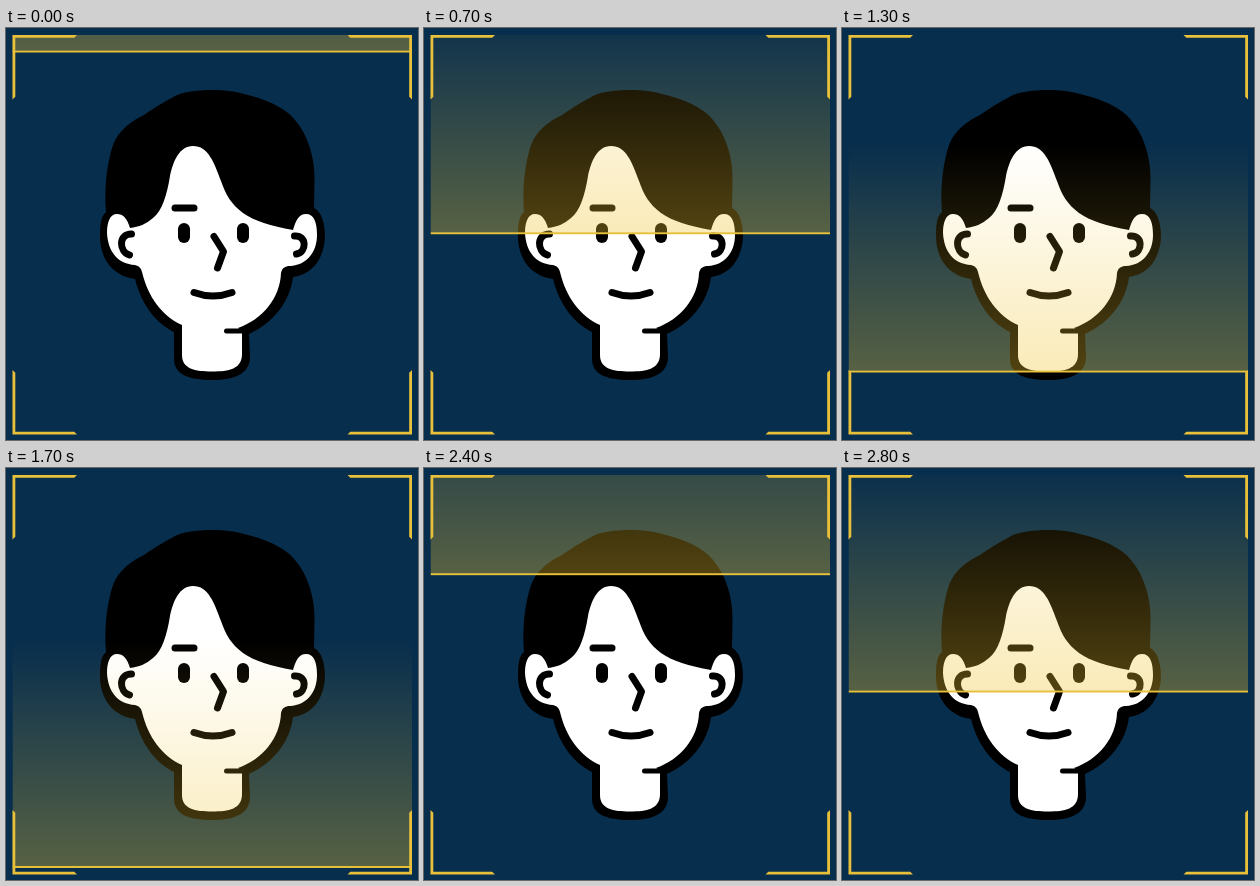
Recreate the animation shown at these times as an HTML page with a canvas. Size 412 by 412 pixels, loop 2900 ms.

```html
<!DOCTYPE html>
<html lang="en">
<head>
<meta charset="utf-8">
<title>Face scan</title>
<style>
  html, body { margin: 0; width: 100%; height: 100%; overflow: hidden; background: #082e4d; }
  canvas { display: block; width: 412px; height: 412px; }
</style>
</head>
<body>
<canvas id="stage"></canvas>
<script>
const SIZE = 412, LOOP = 2900, STEP = 100;
const SWEEP = 2036, OFFSET = 260;
const BOX = { left: 6.5, top: 7, right: 406, bottom: 406.5 };
const FADE = 227;
const NAVY = '#082e4d', YELLOW = '#e8c03a';

const canvas = document.getElementById('stage');
const ratio = window.devicePixelRatio || 1;
canvas.width = canvas.height = SIZE * ratio;
const ctx = canvas.getContext('2d');
ctx.scale(ratio, ratio);

// Sweep easing: time, height and speed at a few moments.
const sweep = [
  [0, 7, 0], [260, 23.5, 0.1], [660, 116.5, 0.285],
  [1160, 259, 0.24], [1560, 343.5, 0.19], [SWEEP, 405, 0.07]
];

function beamHeight(time) {
  const u = (time + OFFSET) % SWEEP;
  const i = sweep.findIndex((k, n) => n > 0 && u <= k[0]);
  const [t0, y0, v0] = sweep[i - 1], [t1, y1, v1] = sweep[i];
  const h = t1 - t0, s = (u - t0) / h, r = 1 - s;
  return (1 + 2 * s) * r * r * y0 + s * r * r * h * v0
       + s * s * (3 - 2 * s) * y1 - s * s * r * h * v1;
}

const silhouette = new Path2D(`M100 184 C98 160 101 135 107 117 C112 103 125 93 138 87
  C151 78 160 73 169 68 C184 61 218 60 238 66 C259 71 279 79 289 92
  C302 107 309 130 308.5 152 L308 180 C316 184 319 196 319 209
  C318 229 308 246 287 249 C284 274 267 295 243 306 L244 329
  C244 345 230 352 206 352 C182 352 168 346 168 331 L168 304
  C149 295 135 275 129 251 C107 248 94 231 94 208 C94 196 95 188 100 184 Z`);

const skin = new Path2D(`M124 200 C121 190 117 186 111 186 C104 186 101 194 101 205
  C102 224 112 236 129 237 C133 238 135 240 136 244 C142 269 156 288 176 297
  L176 327 C176 341 189 343.5 206 343.5 C223 343.5 236 341 236 326 L236 303 L232 300
  C257 291 274 270 275 245 C276 240 279 238 284 238 C301 237 311 224 311 207
  C311 194 308 186 300 186 C293 186 290 192 287 202 C265 198 248 193 237 185
  C225 176 220 167 215 153 C208 134 202 118 187 118 C173 118 167 134 164 148
  C161 167 156 183 147 190 C140 196 133 199 124 200 Z`);

const strokes = [
  ['M169 180 H188', 7],
  ['M208 208.5 L217.5 223.5 L211.5 240', 7],
  ['M188 264.5 Q207 271.5 226 264.5', 7],
  ['M125.5 206 C112.5 206 112.5 223 123.5 227', 7],
  ['M288.5 208 C301 207 301 224 290.5 226', 7],
  ['M220.5 303 H237', 5]
].map(([d, width]) => [new Path2D(d), width]);

function drawFace() {
  ctx.save();
  ctx.filter = `blur(${0.6 * ratio}px)`;
  ctx.fillStyle = '#000';
  ctx.fill(silhouette);
  ctx.fillStyle = '#fff';
  ctx.fill(skin);
  ctx.fillStyle = ctx.strokeStyle = '#000';
  ctx.lineCap = ctx.lineJoin = 'round';
  for (const [path, width] of strokes) {
    ctx.lineWidth = width;
    ctx.stroke(path);
  }
  for (const x of [178, 237]) {
    ctx.beginPath();
    ctx.roundRect(x - 6, 195, 12, 20, 6);
    ctx.fill();
  }
  ctx.restore();
}

function drawBeam(y) {
  const { left, top, right, bottom } = BOX;
  ctx.save();
  ctx.beginPath();
  ctx.rect(left, top, right - left, bottom - top);
  ctx.clip();
  const glow = ctx.createLinearGradient(0, y - FADE, 0, y);
  glow.addColorStop(0, 'rgba(240,196,49,0)');
  glow.addColorStop(1, 'rgba(240,196,49,0.34)');
  ctx.fillStyle = glow;
  ctx.fillRect(left, y - FADE, right - left, FADE - 1);
  ctx.fillStyle = YELLOW;
  ctx.fillRect(left, y - 1, right - left, 2);
  ctx.restore();
}

// One L-shaped corner with mitred ends, mirrored into all four.
function drawCorners() {
  const { left, top, right, bottom } = BOX;
  const arm = 64.5, w = 2.8;
  ctx.fillStyle = YELLOW;
  for (const [x, sx] of [[left, 1], [right, -1]]) {
    for (const [y, sy] of [[top, 1], [bottom, -1]]) {
      ctx.save();
      ctx.translate(x, y);
      ctx.scale(sx, sy);
      ctx.beginPath();
      ctx.moveTo(0, 0);
      ctx.lineTo(arm, 0);
      ctx.lineTo(arm - w, w);
      ctx.lineTo(w, w);
      ctx.lineTo(w, arm - w);
      ctx.lineTo(0, arm);
      ctx.fill();
      ctx.restore();
    }
  }
}

const start = performance.now();

function draw() {
  const elapsed = Math.max(0, performance.now() - start) % LOOP;
  const time = Math.floor(elapsed / STEP) * STEP;
  ctx.fillStyle = NAVY;
  ctx.fillRect(0, 0, SIZE, SIZE);
  drawFace();
  drawBeam(beamHeight(time));
  drawCorners();
  requestAnimationFrame(draw);
}
draw();
</script>
</body>
</html>
```
